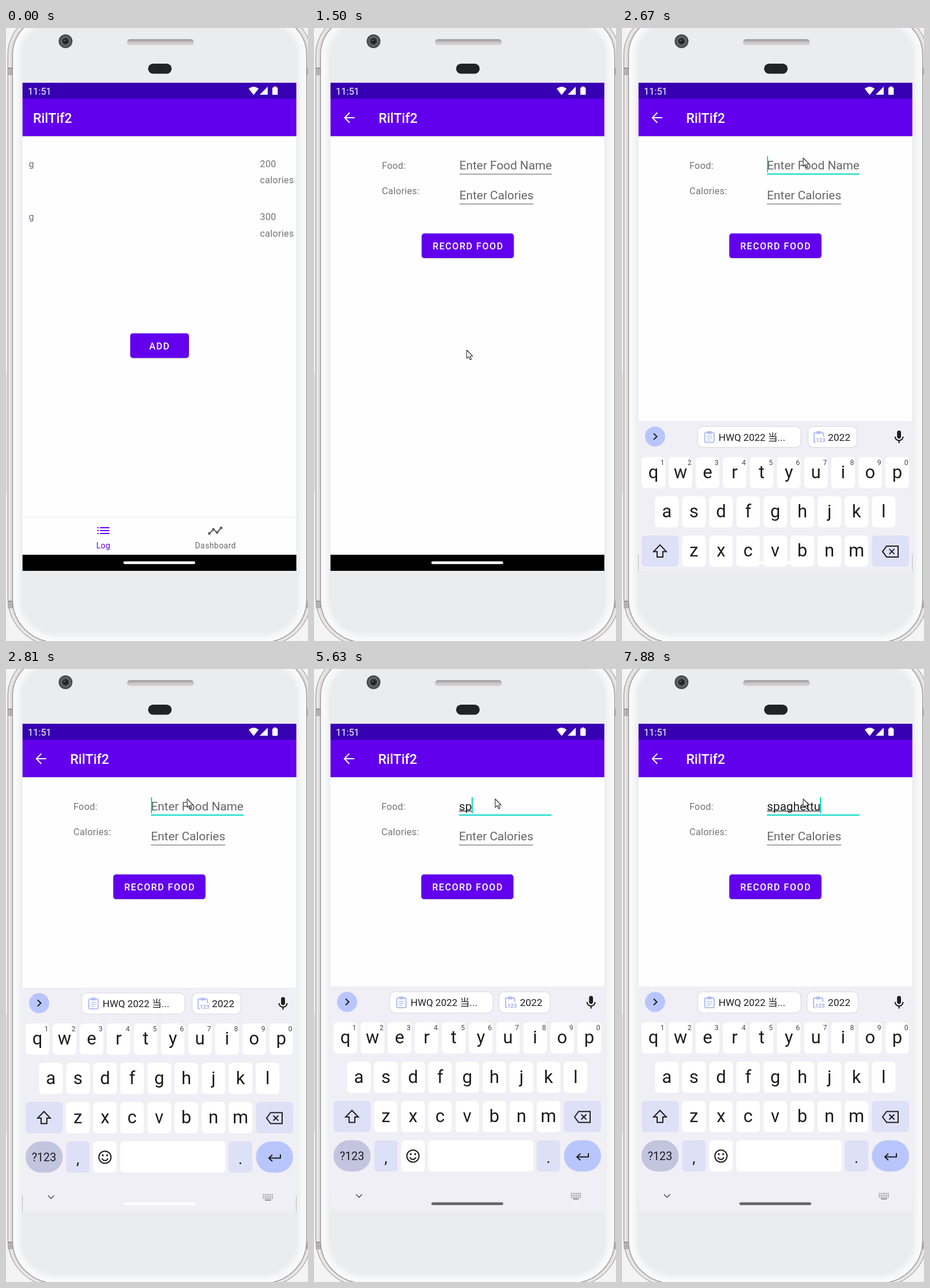
An HTML page with a canvas that plays this animation: 525x1066 px, repeating every 8 s.

```html
<!DOCTYPE html>
<html lang="en">
<head>
<meta charset="utf-8">
<title>Food log</title>
<style>
html, body { margin: 0; width: 100%; height: 100%; overflow: hidden; background: #f4f4f5; }
canvas { display: block; width: 525px; height: 1066px; }
</style>
</head>
<body>
<canvas id="stage"></canvas>
<script>
const W = 525, H = 1066, LOOP = 8000;
const PURPLE = '#6200ee', TEAL = '#03dac5', GREY = '#757575', INK = '#1d1d20';
const SANS = 'Roboto, "Noto Sans CJK SC", "Noto Sans CJK", sans-serif';
const SCREEN = { x: 28.7, y: 95.2, w: 476, h: 848.8 };
const APP = 'RilTif2', WORD = 'spaghettu';
const KEYED = [5300, 5430, 5830, 6700, 6830, 7290, 7420, 7550, 7680];
const CARET = [[2400, 3020], [3500, 4000], [4560, 5030], [5300, 6500], [6700, LOOP]];
const PILL_STEPS = [3020, 3150, 3360, 3500, 3640, 3930, 4000, 4280, 4560, 4630];

const canvas = document.getElementById('stage');
const g = canvas.getContext('2d');
const dpr = window.devicePixelRatio || 1;
canvas.width = W * dpr;
canvas.height = H * dpr;

const clamp = v => Math.max(0, Math.min(1, v));
const smooth = p => p * p * (3 - 2 * p);
const hold = (t, start) => start + Math.floor((t - start) / 70) * 70;
const countAt = (list, t) => list.filter(s => s <= t).length;

function box(x, y, w, h, color, r = 0) {
  g.fillStyle = color;
  g.beginPath();
  g.roundRect(x, y, w, h, r);
  g.fill();
}
// Full-width strip; reaches past the screen so that it can slide
function strip(y, h, color) {
  box(-60, y, 650, h, color);
}
function dot(x, y, r, color) {
  g.fillStyle = color;
  g.beginPath();
  g.arc(x, y, r, 0, Math.PI * 2);
  g.fill();
}
function arc(x, y, r, from, to, width) {
  g.strokeStyle = INK;
  g.lineWidth = width;
  g.beginPath();
  g.arc(x, y, r, from, to);
  g.stroke();
}
function trace(points, close) {
  g.beginPath();
  points.forEach(([x, y], i) => i ? g.lineTo(x, y) : g.moveTo(x, y));
  if (close) g.closePath();
}
function line(points, color, width, close) {
  trace(points, close);
  g.strokeStyle = color;
  g.lineWidth = width;
  g.stroke();
}
function shape(points, color) {
  trace(points, true);
  g.fillStyle = color;
  g.fill();
}
function text(str, x, y, size, color, { weight = 400, align = 'left', spacing = 0 } = {}) {
  g.font = `${weight} ${size}px ${SANS}`;
  g.letterSpacing = spacing + 'px';
  g.textAlign = align;
  g.fillStyle = color;
  g.fillText(str, x, y);
}
function textWidth(str, size) {
  g.font = `400 ${size}px ${SANS}`;
  g.letterSpacing = '0px';
  return g.measureText(str).width;
}

// Phone shell
function shellPath(inset, top, bottom) {
  const l = 3 + inset, r = 531 - inset, rt = 75 - inset * .8, rb = 83 - inset;
  g.beginPath();
  g.roundRect(l, top, r - l, bottom - top, [rt, rt, rb, rb]);
}
function shell() {
  box(0, 0, W, H, '#f4f4f5');
  box(0, 600, 1.2, 207, '#d3cdce');
  shellPath(0, -28, 1074);
  g.fillStyle = '#dcd7d8';
  g.fill();
  g.strokeStyle = '#9b9697';
  g.lineWidth = 1;
  g.stroke();
  shellPath(3.5, -25, 1071);
  g.strokeStyle = '#ebe8e8';
  g.lineWidth = 3;
  g.stroke();
  for (const y of [69, 996]) {
    box(3, y, 9, 13, '#b3b1b2');
    box(3, y, 9, 1.2, '#828081');
    box(522, y, 3, 13, '#b3b1b2');
  }

  g.save();
  shellPath(8.5, -21, 1068);
  g.fillStyle = '#ebecee';
  g.fill();
  g.clip();
  for (let i = 0; i < 8; i++) {
    shellPath(8.5, -21, 1068);
    g.strokeStyle = 'rgba(255,255,255,.16)';
    g.lineWidth = 4 + i * 4;
    g.stroke();
  }
  g.restore();
  shellPath(8.5, -21, 1068);
  g.strokeStyle = '#908c8e';
  g.lineWidth = 1.1;
  g.stroke();

  const mesh = g.createLinearGradient(0, 20, 0, 30);
  mesh.addColorStop(0, '#979394');
  mesh.addColorStop(.4, '#c4bfc0');
  mesh.addColorStop(1, '#dedadb');
  box(210.5, 19.5, 116, 10.5, mesh, 5);
  box(247, 62, 41, 17.5, '#212327', 8.7);
  dot(103.5, 23, 12, '#4b4b4d');
  dot(103.5, 23, 9, '#6a6a6c');
  dot(103.5, 23, 6.5, '#39393b');
  dot(103.5, 23, 3.5, '#17181b');
  dot(102.5, 22, 1.3, '#747b86');
}

function statusBar() {
  strip(95, 28, '#3700b3');
  text('11:51', 38, 116, 16.4, '#fff');
  g.fillStyle = '#fff';
  g.beginPath();
  g.moveTo(430.5, 116.5);
  g.lineTo(421.8, 105.5);
  g.quadraticCurveTo(430.5, 98.5, 439.2, 105.5);
  g.fill();
  shape([[441, 116], [455, 116], [455, 102]], '#fff');
  box(463, 103.3, 9.4, 13, '#fff', 1.5);
  box(465.5, 101.8, 4.4, 3, '#fff');
}

function button(x, y, w, lift = 0) {
  g.save();
  g.shadowColor = 'rgba(0,0,0,.22)';
  g.shadowBlur = (2 + lift) * dpr;
  g.shadowOffsetY = (1 + lift / 3) * dpr;
  box(x, y, w, 42.7, PURPLE, 4.6);
  g.restore();
}
function caption(label, x, y) {
  text(label, x, y, 16.2, '#fff', { weight: 500, spacing: 1.45 });
}

function touchSpot(x, y, alpha) {
  g.globalAlpha = alpha;
  dot(x, y, 13, 'rgba(255,255,255,.45)');
  g.strokeStyle = 'rgba(110,110,120,.4)';
  g.lineWidth = 1;
  g.stroke();
  g.globalAlpha = 1;
}

function toolbar(x) {
  const shade = g.createLinearGradient(0, 188, 0, 191);
  shade.addColorStop(0, 'rgba(0,0,0,.14)');
  shade.addColorStop(1, 'rgba(0,0,0,0)');
  strip(188, 3, shade);
  strip(123, 65, PURPLE);
  text(APP, x, 164.6, 23.2, '#fff', { weight: 500 });
}

function logScreen(t) {
  strip(123, 793, '#fefefe');
  toolbar(47);
  const label = (s, x, y) => text(s, x, y, 16.2, GREY, { spacing: .29 });
  [[241.5, '200'], [334, '300']].forEach(([y, amount]) => {
    label('g', 39.5, y);
    label(amount, 441.5, y);
    label('calories', 441.5, y + 28.7);
  });

  const pressed = t >= 1150;
  button(216, 531, 102, pressed ? 3 : 0);
  if (pressed) {
    const grow = clamp((hold(t, 1150) - 1080) / 210);
    const glow = g.createRadialGradient(268, 554, 0, 268, 554, 20 + 56 * grow);
    glow.addColorStop(0, 'rgba(255,255,255,.27)');
    glow.addColorStop(.45, 'rgba(255,255,255,.22)');
    glow.addColorStop(1, 'rgba(255,255,255,0)');
    box(216, 531, 102, 42.7, glow, 4.6);
  }
  caption('ADD', 249, 558.5);

  strip(850, 1, '#ededee');
  for (const y of [869, 874, 879]) {
    box(158.7, y - 1.1, 2.3, 2.2, PURPLE);
    box(163.3, y - 1.1, 16.5, 2.2, PURPLE);
  }
  const trend = [[353.5, 879], [360.5, 872], [367, 877.3], [374, 869.3]];
  line(trend, '#606062', 2.2);
  trend.forEach(([x, y]) => dot(x, y, 2.4, '#606062'));
  const tab = { align: 'center', spacing: .46 };
  text('Log', 169.2, 904.6, 13.9, PURPLE, tab);
  text('Dashboard', 364.2, 904.6, 13.9, '#6a6a6c', tab);
}

function formScreen(t) {
  strip(123, 793, '#fefefe');
  toolbar(111.5);
  line([[70, 156], [53, 156]], '#fff', 2);
  line([[61.3, 147.3], [52.8, 156], [61.3, 164.7]], '#fff', 2);

  text('Food:', 117.3, 244.5, 16.2, GREY, { spacing: .29 });
  text('Calories:', 117.3, 289, 16.2, GREY, { spacing: .29 });

  const count = countAt(KEYED, t), size = 20.84;
  const typed = WORD.slice(0, count);
  if (count) {
    const marked = Math.max(count - 1, countAt(KEYED, t - 200));
    text(typed, 252, 245.5, size, '#212121');
    box(252, 246.5, textWidth(WORD.slice(0, marked), size), 1.2, '#212121');
  } else {
    text('Enter Food Name', 252, 245.5, size, '#666');
  }
  if (t >= 2330) box(252, 253, 161, 2, TEAL);
  else box(252, 253.5, 161, 1.2, GREY);
  text('Enter Calories', 252, 297.5, size, '#666');
  box(252, 305.6, 129, 1.2, GREY);
  if (CARET.some(([on, off]) => t >= on && t < off)) {
    box(252 + Math.max(0, Math.round(textWidth(typed, size) - .8)), 223, 2, 28, TEAL);
  }
  button(186.5, 357.3, 160.2);
  caption('RECORD FOOD', 205.5, 385);
}

// Keyboard
function clipboard(x, y, digits) {
  const c = '#b3bdf6';
  g.strokeStyle = c;
  g.lineWidth = 2;
  g.beginPath();
  g.roundRect(x - 8, y - 8, 16, 17, 2);
  g.stroke();
  box(x - 4, y - 10.5, 8, 5, c, 1.5);
  if (digits) {
    box(x - 5, y - 1, 15, 12, '#fff');
    text('123', x - 5, y + 8.5, 9.5, '#9eabed', { weight: 700 });
  } else {
    for (const [dy, w] of [[-2, 9], [1.5, 9], [5, 6]]) box(x - 4.5, y + dy - .7, w, 1.5, c);
  }
}
function chip(x, w) {
  box(x, 561.5, w, 36.5, '#fff', 9);
  g.strokeStyle = '#dadae2';
  g.lineWidth = 1.2;
  g.stroke();
}
function key(x, y, w, color, r = 6.5) {
  box(x, y, w, 54.3, color, r);
}
function keyRow(letters, first, y, hints) {
  [...letters].forEach((ch, i) => {
    const cx = first + i * 47.1;
    key(cx - 20.5, y, 41, '#fff');
    text(ch, cx, y + 36.8, 31, INK, { align: 'center' });
    if (hints) text(String((i + 1) % 10), cx + 15.8, y + 13.8, 12.3, '#47474c', { align: 'center' });
  });
}
function keyboard(off) {
  const pale = '#dee0f7', blue = '#b9c5fd';
  g.save();
  g.translate(0, off);
  strip(552, 400, '#f0eff5');

  dot(57.5, 579, 17.5, blue);
  line([[55, 573.5], [60.5, 579], [55, 584.5]], INK, 2.1);
  const shrink = Math.min(2, off);
  chip(131.5, 179.5);
  chip(321.5 + shrink, 89 - shrink * 2);
  clipboard(152, 580);
  clipboard(341 + shrink / 2, 580, true);
  text('HWQ 2022 当...', 168, 586.3, 17, INK);
  text('2022', 358, 586.3, 17.4, INK);

  box(478.2, 568.5, 6.8, 14, INK, 3.4);
  arc(481.6, 579, 7, 0, Math.PI, 2);
  line([[481.6, 586], [481.6, 590.5]], INK, 2.2);

  keyRow('qwertyuiop', 54.5, 614.5, true);
  keyRow('asdfghjkl', 78, 682.8);
  keyRow('zxcvbnm', 125, 751);

  key(34, 751, 64.5, pale);
  line([[66, 767.5], [77, 779], [71, 779], [71, 788.5], [61, 788.5], [61, 779], [55, 779]], INK, 2, true);
  key(434.5, 751, 64.5, pale);
  line([[453, 779], [460, 769.5], [480, 769.5], [480, 788.5], [460, 788.5]], INK, 2, true);
  line([[464.5, 774.5], [473.5, 783.5]], INK, 2);
  line([[473.5, 774.5], [464.5, 783.5]], INK, 2);

  key(34, 819.5, 64.5, '#c3c4de', 27);
  text('?123', 66, 854.3, 19.8, INK, { align: 'center' });
  key(104.5, 819.5, 41, pale);
  text(',', 125, 859, 27, INK, { align: 'center' });
  key(151.6, 819.5, 41, '#fff');
  key(198.5, 819.5, 183, '#fff');
  key(387, 819.5, 41, pale);
  text('.', 407.5, 859, 27, INK, { align: 'center' });
  key(434.5, 819.5, 64.5, blue, 27);
  line([[477, 842], [477, 848.5], [457.5, 848.5]], INK, 2);
  line([[463, 842.8], [457, 848.5], [463, 854.2]], INK, 2);

  arc(172, 847, 10.6, 0, Math.PI * 2, 2);
  dot(168.2, 843.7, 1.7, INK);
  dot(175.8, 843.7, 1.7, INK);
  arc(172, 847.2, 5.6, .35, Math.PI - .35, 2);

  line([[73, 913.5], [78.3, 918.8], [83.6, 913.5]], '#57575c', 1.7);
  for (let row = 0; row < 3; row++) {
    for (let i = 0; i < 6; i++) box(446.7 + i * 3.1, 911.2 + row * 3.2, 1.6, 1.6, '#6b6b70');
  }
  box(450, 920.8, 10.5, 1.5, '#6b6b70');
  g.restore();
}

function pillColor(t) {
  const n = countAt(PILL_STEPS, t);
  if (!n) return '#fff';
  const left = 1 - clamp((PILL_STEPS[n - 1] - 2950) / 1680);
  const v = Math.round(100 + 152 * left ** 1.3);
  return `rgb(${v},${v},${v})`;
}

function pointer(t) {
  if (t < 120) return;
  let x, y;
  if (t < 1980) {
    const p = smooth(clamp((hold(t, 120) - 50) / 630));
    x = 483 - 217.5 * p;
    y = 1064 - 504 * p;
  } else {
    const s = 1 - .755 * (1 - clamp((hold(t, 1980) - 1980) / 210)) ** 1.7;
    x = 265.5 + 49.5 * s ** .36;
    y = 560 - 334 * s;
  }
  const arrow = [[0, 0], [0, 14.6], [3.4, 11.6], [5.9, 17], [8.2, 16], [5.8, 10.8], [10.2, 10.5]]
    .map(([dx, dy]) => [x + dx, y + dy]);
  g.lineJoin = 'round';
  shape(arrow, '#fff');
  line(arrow, '#29292d', 1.1, true);
  g.lineJoin = 'miter';
}

// Quick start, very long settle
function slideEase(p) {
  const knee = 1 / 6;
  return p < knee ? .4 * (p / knee) ** 3 : 1 - .6 * (1 - (p - knee) / (1 - knee)) ** 7;
}

function draw(t) {
  g.setTransform(dpr, 0, 0, dpr, 0, 0);
  shell();
  g.save();
  g.beginPath();
  g.rect(SCREEN.x, SCREEN.y, SCREEN.w, SCREEN.h);
  g.clip();

  const since = t < 1150 ? 0 : hold(t, 1150) - 1270;
  const e = slideEase(clamp(since / 450));
  const fade = clamp((since - 50) / 83);
  if (fade < 1) {
    g.save();
    g.translate(-47.6 * e, 0);
    logScreen(t);
    g.restore();
  }
  if (fade > 0) {
    g.save();
    g.globalAlpha = fade;
    g.translate(47.6 * (1 - e), 0);
    formScreen(t);
    g.restore();
  }
  statusBar();
  const rise = t < 2670 ? 0 : clamp((hold(t, 2670) - 2600) / 280);
  if (rise < 1) strip(916, 28, '#000');
  if (rise > 0) keyboard(392 * (1 - rise) ** 3.8);
  box(204, 927.4, 125, 4.8, pillColor(t), 2.4);

  if (t >= 880 && t < 1150) touchSpot(265, 560, t < 950 ? .6 : 1);
  if (t >= 2260 && t < 2400) touchSpot(315, 226, t < 2330 ? .6 : 1);
  g.restore();
  pointer(t);
}

const begin = performance.now();
function tick() {
  draw((performance.now() - begin) % LOOP);
  requestAnimationFrame(tick);
}
tick();
</script>
</body>
</html>
```
